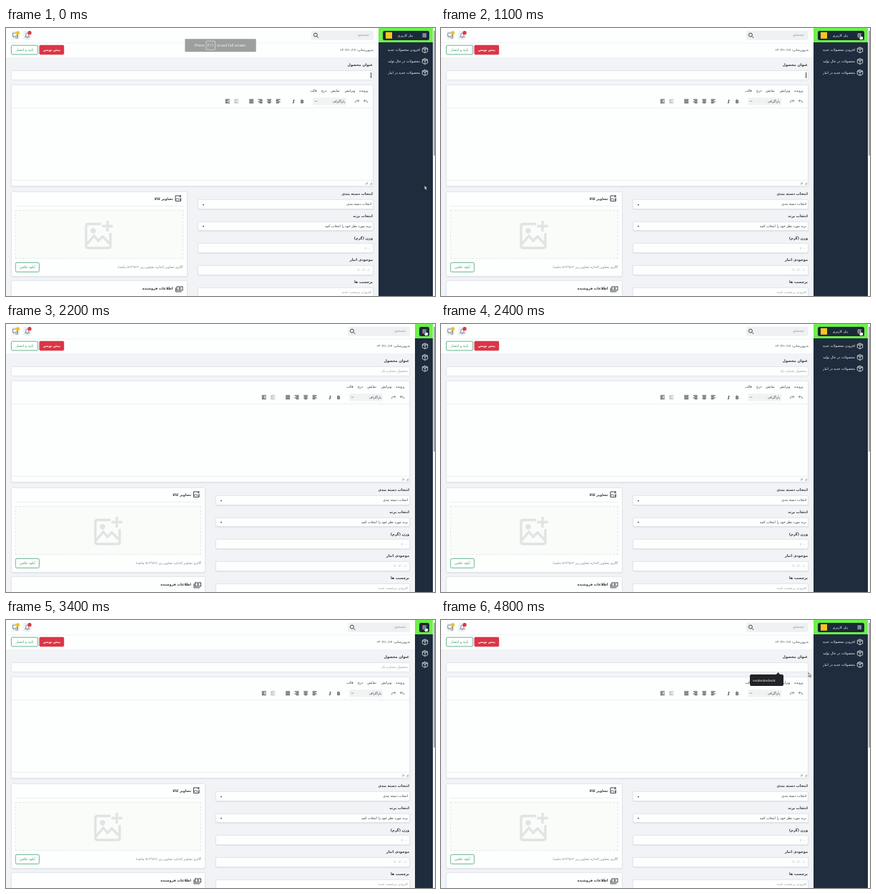
An HTML page for the animation above (5 s loop, 600 by 374 pixels).

```html
<!DOCTYPE html>
<html>
<head>
<meta charset="utf-8">
<title>Product panel</title>
<style>
html, body { margin: 0; width: 100%; height: 100%; overflow: hidden; background: #f1f3f6; }
#stage { position: relative; width: 600px; height: 374px; overflow: hidden; }
#main, #side, #main div, #side div, #bar, svg { position: absolute; box-sizing: border-box; }

/* stretching boxes */
#main { left: 0; top: 0; width: 521px; height: 374px; background: #f1f3f6; animation: grow 5s step-end infinite; }
#main .head { left: 0; right: 0; height: 20px; background: #fdfefe; }
#main .box { left: 7px; right: 7px; top: var(--y); height: var(--h); background: #fdfefe; border: .6px solid #e3e6ea; border-radius: 2px; }
#main .card { box-shadow: 0 1px 2px #0001; }
#main .half { right: auto; width: calc(50% - 14px); }
#main .col { left: auto; width: calc(50% - 14px); box-shadow: 0 .6px 1px #0002; }
#main .rule { left: 5px; right: 5px; height: 1px; top: var(--y); background: #eceff0; }
#main .wide { left: 0; right: 0; }
#main .drop { left: 5px; right: 5px; top: 25px; height: 68px; border: 1px dashed #e4e8e6; background: #fafcfa; }
#main .drop svg { left: calc(50% - 20px); top: 14px; }
#main .arrow { left: 6px; top: 5.5px; border: 1.8px solid transparent; border-top: 2.2px solid #222; }
#side { right: 3px; top: 0; width: 76px; height: 374px; background: #1e2c3d; animation: fold 5s step-end infinite; }
#side .green { left: 0; right: 0; height: 20px; background: #6cf04b; }
#side .pill { left: 6px; right: 5px; top: 3.5px; height: 13.5px; border-radius: 2.5px; background: #1b2938; }
#bar { right: 0; top: 0; width: 3px; height: 374px; background: #f4f5f6; }
#bar::after { content: ""; position: absolute; left: .8px; top: 4px; width: 2.2px; height: 174px; background: #a8abad; }

/* drawn layer */
svg { left: 0; top: 0; overflow: visible; }
text { font: 4.7px "DejaVu Sans", sans-serif; direction: rtl; fill: #2b3036; text-rendering: geometricPrecision; }
.b { font-weight: bold; font-size: 5px; }
.ph { fill: #9a9fa3; }
.mid { text-anchor: middle; }
.w { fill: #fff; }
.latin { font-family: Roboto, sans-serif; direction: ltr; }
.ln { fill: none; stroke: #2b3036; stroke-width: .9; }
.thin { stroke: #5c6267; stroke-width: .7; }
.dim { stroke: #a5a9ac; }
.go { fill: #fdfefe; stroke: #43a574; stroke-width: .8; }
.got { fill: #2f9a66; text-anchor: middle; }
.r { --d: 51px; animation: shift 5s step-end infinite; }
.l { --d: 25.5px; animation: shift 5s step-end infinite; }
.label { animation: label 5s step-end infinite; }
.hint { animation: hint 5s step-end infinite; }
.caret { animation: caret 5s step-end infinite; }
.tip { animation: tip 5s step-end infinite; }
.banner { animation: banner 5s linear infinite; }
.banner text { fill: #f2f3f3; font-size: 5.3px; }
.pointer { animation: travel 5s infinite, pointerOn 5s step-end infinite; }
.hand { animation: handOn 5s step-end infinite; }

@keyframes grow { 0%, 46%, 70% { width: 521px } 32%, 56% { width: 572px } 100% { width: 521px } }
@keyframes fold { 0%, 46%, 70% { width: 76px } 32%, 56% { width: 25px } 100% { width: 76px } }
@keyframes shift { 0%, 46%, 70%, 100% { transform: translateX(0) } 32%, 56% { transform: translateX(var(--d)) } }
@keyframes label { 0%, 46%, 70%, 100% { opacity: 1 } 32%, 56% { opacity: 0 } }
@keyframes hint { 0%, 86%, 100% { opacity: 0 } 32% { opacity: 1 } }
@keyframes caret { 0%, 22%, 86% { opacity: 1 } 12%, 32%, 96%, 100% { opacity: 0 } }
@keyframes tip { 0% { opacity: 0 } 86%, 100% { opacity: 1 } }
@keyframes banner { 0%, 2% { opacity: 1 } 8%, 100% { opacity: 0 } }
@keyframes pointerOn { 0%, 72%, 100% { opacity: 1 } 14% { opacity: 0 } }
@keyframes handOn { 0%, 72%, 100% { opacity: 0 } 14% { opacity: 1 } }
@keyframes travel {
  0% { transform: translate(585px, 219.5px); animation-timing-function: steps(6, end) }
  12%, 70% { transform: translate(586px, 9px); animation-timing-function: steps(5, end) }
  80% { transform: translate(496.5px, 73px); animation-timing-function: steps(3, end) }
  86% { transform: translate(506px, 66px); animation-timing-function: steps(2, end) }
  90%, 100% { transform: translate(513.5px, 73px) }
}
</style>
</head>
<body>
<div id="stage">
  <div id="main">
    <div class="head" style="top:0"></div>
    <div class="head" style="top:20.7px"></div>
    <div class="box" style="--y:59px;--h:14px"></div>
    <div class="box card" style="--y:79px;--h:142px">
      <div class="rule wide" style="--y:31px"></div>
      <div class="rule wide" style="--y:132px"></div>
    </div>
    <div class="box card half" style="--y:228px;--h:119px">
      <div class="rule" style="--y:19px"></div>
      <div class="drop">
        <svg width="40" height="40" fill="none" stroke="#e0e4e3" stroke-width="3.4">
          <path d="M23 4.5H5Q2 4.5 2 7.5V35Q2 38 5 38H33Q36 38 36 35V17M3 33L13 21L19 28L25 22L36 33"/>
          <path d="M32 0V15M24.5 7.5H39.5"/>
          <circle cx="12" cy="14" r="2"/>
        </svg>
      </div>
    </div>
    <div class="box card half" style="--y:352px;--h:40px"><div class="rule" style="--y:20.5px"></div></div>
    <div class="box col" style="--y:239px;--h:13.5px"><div class="arrow"></div></div>
    <div class="box col" style="--y:269.5px;--h:13.5px"><div class="arrow"></div></div>
    <div class="box col" style="--y:300px;--h:14px"></div>
    <div class="box col" style="--y:331px;--h:14px"></div>
    <div class="box col" style="--y:362px;--h:14px"></div>
  </div>

  <div id="side"><div class="green"></div><div class="pill"></div></div>
  <div id="bar"></div>

  <svg width="600" height="374">
    <defs>
      <path id="cube" d="M0 -4L3.7 -2.2V2.2L0 4L-3.7 2.2V-2.2ZM-3.7 -2.2L0 -.4L3.7 -2.2M0 -.4V4M-1.9 -3.1L1.9 -1.3" fill="none" stroke="#f3f6f8" stroke-width=".75"/>
    </defs>

    <!-- left side of the header -->
    <rect x="7.5" y="4" width="11.5" height="12.5" rx="2" fill="#f0f2f4"/>
    <rect x="24" y="4" width="11.5" height="12.5" rx="2" fill="#f0f2f4"/>
    <path class="ln thin" d="M9.5 7H15.5V11.5H12L10.5 13V11.5H9.5ZM16.5 9.5V13.5H15.5V14.5L14 13.5H12.5"/>
    <path class="ln thin" d="M26.5 12.5Q27.7 11.5 27.7 9.5Q27.7 7 29.7 7Q31.7 7 31.7 9.5Q31.7 11.5 32.9 12.5ZM28.8 14H30.6"/>
    <circle cx="16.5" cy="6.7" r="2.5" fill="#f2c318"/>
    <circle cx="33" cy="6.7" r="2.6" fill="#dc3545"/>
    <text class="mid" x="16.5" y="7.8" style="font-size:3px">۰</text>
    <text class="mid w" x="33" y="7.8" style="font-size:3px">۰</text>
    <rect class="go" x="7.4" y="24.2" width="37.2" height="12.7" rx="1.8"/>
    <text class="got" x="26" y="31.8">تایید و انتشار</text>
    <rect x="46.5" y="23.8" width="34.7" height="13.4" rx="1.8" fill="#dc3545"/>
    <text class="mid w b" x="64" y="31.7" style="font-size:4.5px">پیش نویس</text>

    <!-- parts that keep to the right edge -->
    <g class="r">
      <rect x="427" y="3.8" width="87" height="13" rx="2.5" fill="#eef0f2"/>
      <g class="ln"><circle cx="432.9" cy="9.6" r="2.5"/><path d="M434.8 11.5L437.2 13.9"/></g>
      <text class="ph" x="508" y="11.4" style="font-size:5.2px">جستجو</text>
      <text x="514" y="31.6" style="font-size:4.4px">به&zwnj;روزرسانی: ۱۴۰۲/۱۰/۱۷</text>
      <text class="b" x="513" y="52.5">عنوان محصول</text>
      <text class="ph hint" x="511" y="67.3">محصول شماره یک</text>
      <rect class="caret" x="510.2" y="62" width=".9" height="8" fill="#222"/>

      <text class="mid" x="500.5" y="88.5">پرونده</text>
      <text class="mid" x="481" y="88.5">ویرایش</text>
      <text class="mid" x="460.5" y="88.5">نمایش</text>
      <text class="mid" x="444.7" y="88.5">درج</text>
      <text class="mid" x="430" y="88.5">قالب</text>
      <path class="ln thin" d="M502 99.8L500.2 101.6L502 103.4M500.4 101.6H504Q506 101.8 505.4 104.5"/>
      <path class="ln thin" d="M492 99.8L493.8 101.6L492 103.4M493.6 101.6H490Q488 101.8 488.6 104.5"/>
      <rect x="429" y="97.2" width="47" height="10.2" rx="1.5" fill="#f0f2f3"/>
      <text x="474" y="103.5">پاراگراف</text>
      <path class="ln thin" d="M432 101.5L433.5 103L435 101.5"/>
      <text class="mid" x="414.2" y="104.7" style="font:bold 6.6px Inter,sans-serif">B</text>
      <text class="mid" x="402" y="104.7" style="font:italic bold 6.6px 'Noto Serif',serif">I</text>
      <g class="ln">
        <path d="M377.7 99.8h6m-6 1.6h4m-4 1.6h6m-6 1.6h4"/>
        <path d="M365.2 99.8h6m-5 1.6h4m-5 1.6h6m-5 1.6h4"/>
        <path d="M352.6 99.8h6m-4 1.6h4m-6 1.6h6m-4 1.6h4"/>
        <path d="M340.2 99.8h6m-6 1.6h6m-6 1.6h6m-6 1.6h6"/>
        <path class="dim" d="M319.2 99.8h6m-6 1.6h3.5m-3.5 1.6h3.5m-3.5 1.6h6m-1.7 -2.4h2"/>
        <path d="M306.8 99.8h6m-6 1.6h3.5m-3.5 1.6h3.5m-3.5 1.6h6m-1.7 -2.4h2"/>
      </g>
      <text class="mid latin" x="504.8" y="218.5" style="fill:#666">P</text>
      <path class="ln thin" d="M509.2 218.7L512 215.9M510.9 218.7L512 217.6"/>

      <text class="b" x="513" y="232.7">انتخاب دسته بندی</text>
      <text x="511" y="247">انتخاب دسته بندی</text>
      <text class="b" x="513" y="263.5">انتخاب برند</text>
      <text x="511" y="277.6">برند مورد نظر خود را انتخاب کنید</text>
      <text class="b" x="513" y="294.5">وزن (گرم)</text>
      <text class="ph" x="511" y="308.5" style="font-size:4.3px">۲۰۰۰</text>
      <text class="b" x="513" y="325">موجودی انبار</text>
      <text class="ph" x="511" y="339.3" style="font-size:4.3px">۱۰، ۳۰، ۹۰</text>
      <text class="b" x="513" y="355.7">برچسب ها</text>
      <text class="ph" x="511" y="370">افزودن برچسب جدید</text>
    </g>

    <!-- left cards -->
    <g class="l">
      <text class="b" x="233.5" y="239.7" style="font-size:4.8px">تصاویر کالا</text>
      <g class="ln">
        <path d="M242 234H237V241.5H244.5V237M237 240L239.5 237.5L241.5 239.5L242.5 238.5L244.5 240.5"/>
        <path d="M243.6 233V236.4M241.9 234.7H245.3"/>
      </g>
      <text x="247.5" y="335" style="fill:#777c80;font-size:4.5px">گالری تصاویر (اندازه تصاویر زیر ۵۱۲*۵۱۲ نباشد)</text>
      <text class="b" x="233.5" y="364.7" style="font-size:4.8px">اطلاعات فروشنده</text>
      <g class="ln">
        <rect x="239" y="361" width="8" height="5"/>
        <circle cx="243" cy="363.5" r="1.1"/>
        <path d="M237.4 362.5V368H245.5"/>
      </g>
    </g>
    <rect class="go" x="13.4" y="327.4" width="33" height="13" rx="1.8"/>
    <text class="got" x="30" y="335.2">آپلود عکس</text>

    <!-- sidebar -->
    <path d="M582.5 8.2h5.5m-5.5 2h5.5m-5.5 2h5.5" stroke="#fff" stroke-width=".9"/>
    <use href="#cube" x="586" y="30.7"/>
    <use href="#cube" x="586" y="46.5"/>
    <use href="#cube" x="586" y="62.3"/>
    <g class="label">
      <rect x="531" y="5.8" width="9" height="9" fill="#f7c51e"/>
      <text class="w" x="569" y="11.6">پنل کاربری</text>
      <text class="w" x="579" y="31.9">افزودن محصولات جدید</text>
      <text class="w" x="579" y="47.7">محصولات در حال تولید</text>
      <text class="w" x="579" y="63.5">محصولات جدید در انبار</text>
    </g>

    <g class="tip">
      <path d="M434 76H468.8L471.5 73L474.2 76H477Q479 76 479 78V90Q479 92 477 92H434Q432 92 432 90V78Q432 76 434 76Z" fill="#212326"/>
      <text class="latin w" x="436" y="85.6" style="font-size:4.4px">vvsdvsdvsdvsdv</text>
    </g>

    <g class="banner">
      <rect x="250.3" y="15.3" width="99.4" height="18" rx="1" fill="#9d9f9f"/>
      <rect x="280" y="18.3" width="12.5" height="12" rx="1" fill="none" stroke="#e6e8e8" stroke-width=".7"/>
      <text class="latin" x="264" y="26.2">Press</text>
      <text class="latin mid" x="286.2" y="26.2">F11</text>
      <text class="latin" x="295" y="26.2">to exit full screen</text>
    </g>

    <g fill="#fff" stroke="#222" stroke-width=".6">
      <path class="pointer" d="M.3 .3V6.1L1.6 4.9L2.5 7.1L3.5 6.7L2.6 4.6H4.4Z"/>
      <path class="hand" d="M586 9Q586.6 8.3 587.2 9V11.5L590 12.2Q590.7 12.6 590.5 13.5L589.8 16.5H586.3L584.3 13.6Q584.2 12.8 585 13L586 13.7Z"/>
    </g>
  </svg>
</div>
</body>
</html>
```
